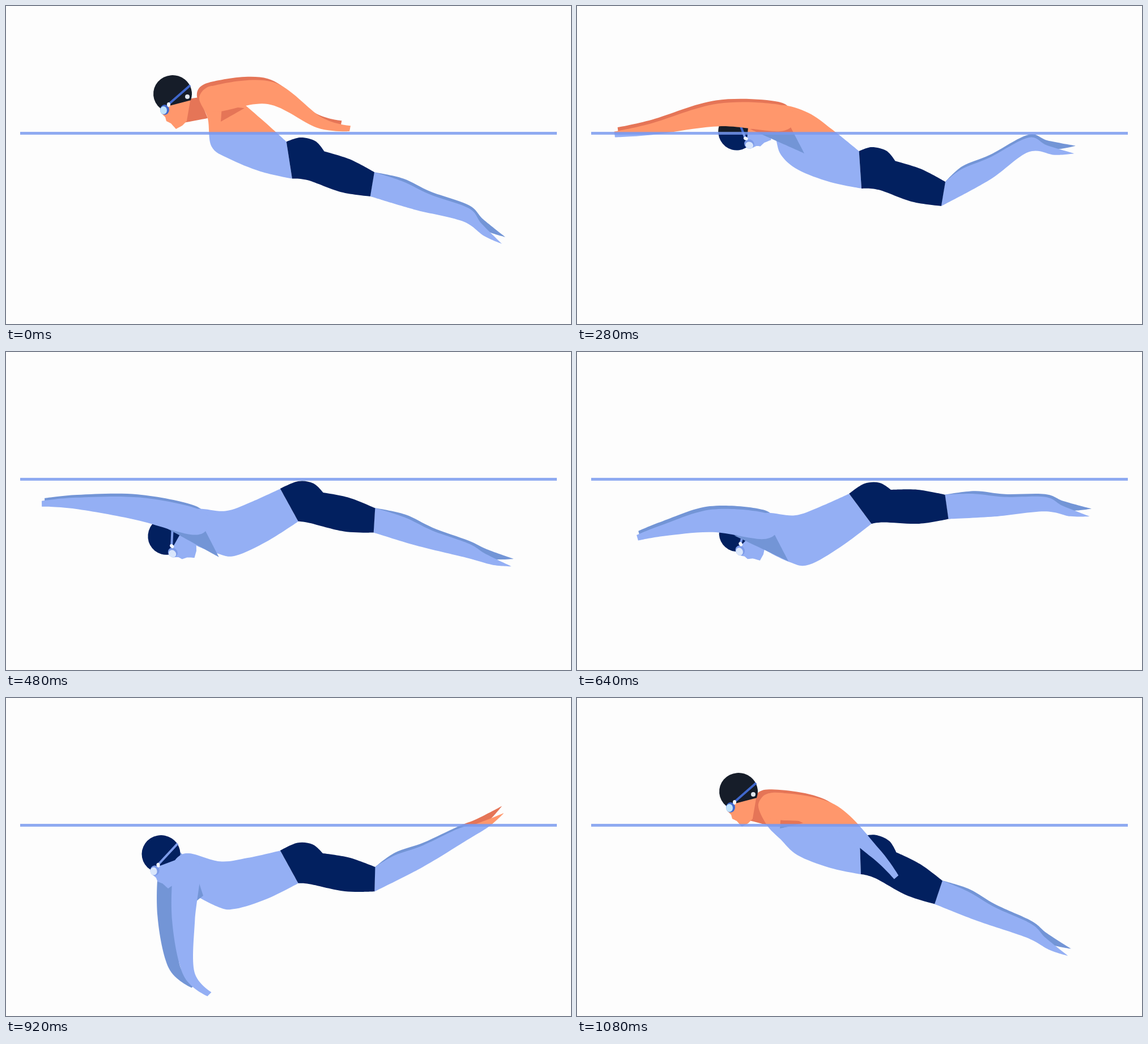
An HTML page with a canvas that plays this animation: 997 px wide and 561 px high, repeating every 1120 ms.

```html
<!DOCTYPE html>
<html lang="en">
<head>
<meta charset="utf-8">
<title>Butterfly stroke</title>
<style>
html, body { margin: 0; height: 100%; overflow: hidden; background: #fdfdfd; }
canvas { display: block; }
</style>
</head>
<body>
<canvas id="stage" width="997" height="561"></canvas>
<script>
const ctx = document.getElementById('stage').getContext('2d');
const LOOP = 1120, STEP = 40, SURFACE = 224;

const AIR = { skin: '#ff976c', shade: '#e57557', cap: '#161d29', strap: '#4068cc',
  lens: '#bfe2fb', badge: '#dfe6ee', shorts: '#02205f' };
const WATER = { ...AIR, skin: '#94aff4', shade: '#7395d6', cap: '#02205f',
  strap: '#7d9be8', lens: '#d9e6fc', badge: '#02205f' };

// Joint values at the key moments; angles in degrees.
// The arm turns half a circle per stroke while its reach changes sign
// as it swings past the viewer, so its loop closes with an eighth value.
const TIMES = [0, 120, 280, 480, 760, 920, 1080, LOOP];
const KEYS = {
  hipY: [272, 278, 289, 270, 285, 298, 278],
  tilt: [9, 7, 4, 29, 39, 29, 2],
  thigh: [16, 13, 16, 10, -7, 8, 25],
  shank: [18, -5, -30, 18, -19, -27, 23],
  foot: [39, 47, 11, 20, 8, -27, 33],
  shoulderX: [366, 322, 360, 335, 330, 320, 345],
  shoulderY: [164, 162, 198, 300, 309, 297, 190],
  upper: [-6, 19, 3, 13, -7, -86, -171, -186],
  fore: [31, 25, -12, 5, -35, -96, -140, -149],
  hand: [11, 10, -8, -1, -40, -135, -131, -169],
  reach: [0.92, 0.2, -1.1, -1, -0.7, -0.85, -0.95, -0.92],
  headX: [295, 287, 278, 281, 283, 274, 286],
  headY: [150, 166, 218, 320, 305, 270, 160],
  turn: [0, -25, -70, -46, -23, -6, 0]
};

// Cubic interpolation without overshoot.
function ease(list, t) {
  const value = k => list[k] ?? list[0];
  const slope = k => {
    const i = (k + 7) % 7;
    return (value(i + 1) - value(i)) / (TIMES[i + 1] - TIMES[i]);
  };
  const tangent = k => {
    const p = slope(k - 1), q = slope(k);
    return p * q > 0 ? 2 * p * q / (p + q) : 0;
  };
  const i = TIMES.findIndex(end => end > t) - 1;
  const span = TIMES[i + 1] - TIMES[i], u = (t - TIMES[i]) / span, v = 1 - u;
  return value(i) + (value(i + 1) - value(i)) * u * u * (3 - 2 * u)
    + span * u * v * (v * tangent(i) - u * tangent(i + 1));
}

const rad = deg => deg * Math.PI / 180;
const add = ([x, y], dx, dy) => [x + dx, y + dy];
const mix = (a, b, u) => [a[0] + (b[0] - a[0]) * u, a[1] + (b[1] - a[1]) * u];

// Point given along and across a direction.
function ahead(from, angle, along, across = 0) {
  const c = Math.cos(rad(angle)), s = Math.sin(rad(angle));
  return add(from, along * c - across * s, along * s + across * c);
}

// Closed smooth shape; the listed points stay sharp.
function shape(pts, color, corners = []) {
  const n = pts.length, at = i => pts[(i + n) % n];
  const pull = (i, axis) => corners.includes(i % n) ? 0
    : (at(i + 1)[axis] - at(i - 1)[axis]) / 6;
  ctx.beginPath();
  ctx.moveTo(...pts[0]);
  for (let i = 0; i < n; i++) {
    const [x, y] = at(i), [X, Y] = at(i + 1);
    ctx.bezierCurveTo(x + pull(i, 0), y + pull(i, 1),
      X - pull(i + 1, 0), Y - pull(i + 1, 1), X, Y);
  }
  ctx.fillStyle = color;
  ctx.fill();
}

function polygon(pts, color) {
  shape(pts, color, pts.map((_, i) => i));
}

function disc(x, y, rx, ry, color, from = 0, to = 360) {
  ctx.beginPath();
  ctx.ellipse(x, y, rx, ry, 0, rad(from), rad(to));
  ctx.fillStyle = color;
  ctx.fill();
}

function drawArm(shoulder, pose, reach, color) {
  const sign = Math.sign(reach), size = Math.abs(reach);
  const elbow = ahead(shoulder, pose.upper, 105 * sign * Math.sqrt(size));
  const wrist = ahead(elbow, pose.fore, 110 * reach);
  const joints = [shoulder, elbow, wrist, ahead(wrist, pose.hand, 60 * reach)];
  const left = [], right = [];
  [23, 20, 10, 5].forEach((width, i) => {
    const a = joints[Math.max(i - 1, 0)], b = joints[Math.min(i + 1, 3)];
    const angle = Math.atan2(b[1] - a[1], b[0] - a[0]) * 180 / Math.PI;
    left.push(ahead(joints[i], angle, 0, -width));
    right.unshift(ahead(joints[i], angle, 0, width));
    if (!i) left.unshift(ahead(shoulder, angle, -width));
  });
  shape([...left, ...right], color, [4, 5]);
}

function drawLeg(knee, kneeTop, kneeBottom, shank, foot, color) {
  const ankle = ahead(knee, shank, 173);
  shape([
    kneeTop,
    ahead(knee, shank, 50, -21), ahead(knee, shank, 103, -14),
    ahead(ankle, foot, -2, -12), ahead(ankle, foot, 33, -5),
    ahead(ankle, foot, 83), ahead(ankle, foot, 50, 9), ahead(ankle, foot, 3, 13),
    ahead(knee, shank, 84, 20),
    kneeBottom
  ], color, [0, 5, 9]);
}

function drawHead(pose, c) {
  ctx.save();
  ctx.translate(pose.headX, pose.headY);
  ctx.rotate(rad(pose.turn));
  polygon([[-20, 20], [-22, 38], [-14, 46], [-12, 53], [-4, 57], [5, 67],
    [16, 61], [24, 53], [31, 12]], c.skin);
  disc(-1, 5, 34, 33, c.cap, 130, 380);
  ctx.beginPath();
  ctx.moveTo(-10, 25);
  ctx.lineTo(30, -10);
  ctx.strokeStyle = c.strap;
  ctx.lineWidth = 4;
  ctx.stroke();
  disc(-15, 33, 8, 9, c.strap);
  disc(-17, 34, 6, 7, c.lens);
  disc(-8, 24, 3, 4, '#f4f8ff');
  disc(25, 10, 4, 4, c.badge);
  ctx.restore();
}

function drawSwimmer(pose, c) {
  const { tilt, thigh, shank, foot, turn, reach } = pose;
  const shoulder = [pose.shoulderX, pose.shoulderY], hip = [500, pose.hipY];
  const head = [pose.headX, pose.headY];
  const waistTop = ahead(hip, tilt, 0, 0).map((v, i) => v - 33 * (i ? Math.cos(rad(tilt)) : Math.sin(rad(tilt))));
  const waistBottom = mix(waistTop, hip, 2);
  const knee = ahead(hip, thigh, 152);
  const kneeTop = ahead(hip, thigh, 150, -21), kneeBottom = ahead(hip, thigh, 155, 22);

  // The back arches and the belly drops as the pelvis tilts.
  const arch = Math.max(-16, 20 - 1.25 * tilt);
  const top = add(shoulder, 0, -23), nape = add(shoulder, -25, -3);
  const throat = add(shoulder, -10, 34);
  const belly = [388 + 0.6 * tilt, (pose.shoulderY + pose.hipY + 82 + 2.3 * tilt) / 2];
  const chest = add(belly, -30 - 0.1 * tilt, Math.min(-4, 0.9 * tilt - 30));

  // How far the upper arm points back and down.
  const back = Math.cos(rad(pose.upper)) * Math.sign(reach);
  const down = Math.max(0, Math.sin(rad(pose.upper)) * Math.sign(reach));

  drawArm(add(shoulder, -6 - 20 * down, -6), pose, reach * 0.95, c.shade);
  polygon([ahead(head, turn, 26, 14), ahead(head, turn, 18, 56), throat, nape], c.shade);
  drawHead(pose, c);
  shape([
    nape, top,
    add(mix(top, waistTop, 0.35), 0, -arch), add(mix(top, waistTop, 0.65), 0, -0.7 * arch),
    waistTop, waistBottom,
    add(mix(waistBottom, belly, 0.5), 0, 5), belly, chest, throat
  ], c.skin, [4, 5]);
  polygon([
    add(shoulder, 15, 12),
    add(ahead(shoulder, pose.upper, 55 * Math.sign(reach)), 0, 22),
    add(shoulder, 27 - 14 * back, 51 - 11 * back)
  ], c.shade);

  drawLeg(add(knee, 1, -5), kneeTop, kneeBottom, shank, foot - 6, c.shade);
  drawLeg(knee, kneeTop, kneeBottom, shank, foot, c.skin);
  const onThigh = (along, across) => ahead(hip, thigh, along, across);
  shape([
    waistTop, onThigh(8, -44), onThigh(35, -45), onThigh(55, -32), onThigh(102, -31),
    kneeTop, kneeBottom, onThigh(103, 29), onThigh(41, 25), waistBottom
  ], c.shorts, [0, 3, 5, 6, 9]);

  drawArm(shoulder, pose, reach, c.skin);
}

function drawLayer(pose, top, bottom, palette) {
  ctx.save();
  ctx.beginPath();
  ctx.rect(0, top, 997, bottom - top);
  ctx.clip();
  drawSwimmer(pose, palette);
  ctx.restore();
}

function frame(now) {
  const t = Math.floor(now % LOOP / STEP) * STEP, pose = {};
  for (const name in KEYS) pose[name] = ease(KEYS[name], t);
  ctx.fillStyle = '#fdfdfd';
  ctx.fillRect(0, 0, 997, 561);
  drawLayer(pose, 0, SURFACE, AIR);
  drawLayer(pose, SURFACE, 561, WATER);
  ctx.fillStyle = 'rgba(120,153,240,.82)';
  ctx.fillRect(25, 222, 947, 5);
  requestAnimationFrame(frame);
}
requestAnimationFrame(frame);
</script>
</body>
</html>
```
